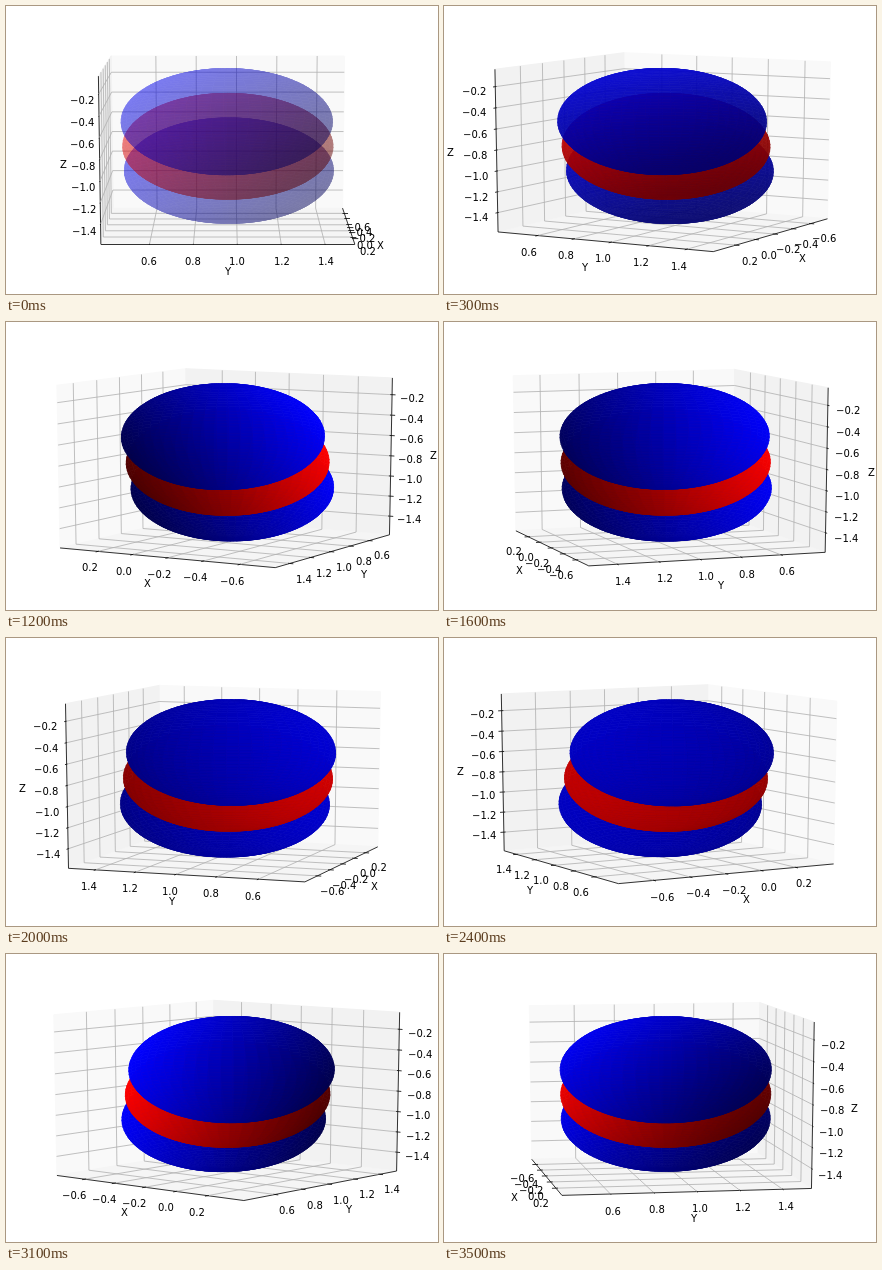
An HTML page with a canvas that plays this animation: 432x288 px, repeating every 3.6 s.

```html
<!DOCTYPE html>
<html lang="en">
<head>
<meta charset="utf-8">
<title>Three spheres</title>
<style>
  html, body { margin: 0; width: 100%; height: 100%; overflow: hidden; background: #fff; }
  canvas { display: block; }
</style>
</head>
<body>
<canvas id="stage" width="432" height="288"></canvas>
<script>
const W = 432, H = 288;
const STEPS = 36, STEP_MS = 100;
const ctx = document.getElementById('stage').getContext('2d');

function makeLayer() {
  const c = document.createElement('canvas');
  c.width = W;
  c.height = H;
  return c.getContext('2d');
}
const back = makeLayer(), front = makeLayer();

// Data space: box centre and range for x, y, z
const centre = [-0.1845, 0.957, -0.812];
const range = [1.166, 1.111, 1.488];
const shift = [-0.03, 0.005, -0.244];
const RADIUS = 0.5;

// Box in unit space, centred on the origin
const EDGE = 0.5 + 1 / 48;
const DELTA = 1 / 12;
const PER_POINT = 48 / (W + H);
const TICK_PAD = 11.5 * PER_POINT * DELTA;
const NAME_PAD = 25 * PER_POINT * DELTA;

const axes = [
  { name: 'X', i: 0, tickDir: 1, flip: 1, ticks: [-0.6, 5], pane: '#f9f9f9' },
  { name: 'Y', i: 1, tickDir: 0, flip: 0, ticks: [0.6, 5], pane: '#f2f2f2' },
  { name: 'Z', i: 2, tickDir: 0, flip: 0, ticks: [-1.4, 7], pane: '#f5f5f5' }
];

const DIST = 10, VIEW = 0.185;
const elev = Math.PI / 18;
const ce = Math.cos(elev), se = Math.sin(elev);
let ca = 1, sa = 0;

function project([x, y, z]) {
  const toward = ca * x + sa * y;
  const depth = ce * toward + se * z;
  const k = 1 / (DIST - depth) / VIEW;
  const right = ca * y - sa * x;
  const up = ce * z - se * toward;
  return [W * (0.095 / VIEW + right * k), H * (0.09 / VIEW - up * k)];
}

const withValue = (p, i, v) => p.map((old, j) => j === i ? v : old);
const outward = (p, skip, d) => p.map((v, j) => j === skip ? v : v + (v < 0 ? -d : d));

function trace(c, pts) {
  c.beginPath();
  pts.forEach(([x, y], j) => j ? c.lineTo(x, y) : c.moveTo(x, y));
}

function line(points, color) {
  const pts = points.map(project);
  if (pts.length === 2) {
    for (const k of [0, 1]) {
      if (Math.abs(pts[0][k] - pts[1][k]) < 0.01) {
        pts[0][k] = pts[1][k] = Math.floor(pts[0][k]) + 0.5;
      }
    }
  }
  trace(ctx, pts);
  ctx.strokeStyle = color;
  ctx.lineWidth = 0.8;
  ctx.stroke();
}

function text(str, p, drop) {
  const [x, y] = project(p);
  ctx.fillStyle = '#000';
  ctx.fillText(str, Math.round(x - ctx.measureText(str).width / 2), Math.round(y + drop));
}

function drawPane(axis, far) {
  const a = (axis.i + 1) % 3, b = (axis.i + 2) % 3;
  const corners = [[-1, -1], [1, -1], [1, 1], [-1, 1]].map(([m, n]) => {
    const p = far.slice();
    p[a] = m * EDGE;
    p[b] = n * EDGE;
    return project(p);
  });
  trace(ctx, corners);
  ctx.closePath();
  ctx.fillStyle = ctx.strokeStyle = axis.pane;
  ctx.lineWidth = 1;
  ctx.fill();
  ctx.stroke();
}

function drawAxis({ name, i, tickDir, flip, ticks }, far) {
  const edge = withValue(far, flip, -far[flip]);
  line([withValue(edge, i, -EDGE), withValue(edge, i, EDGE)], '#000');
  text(name, outward(withValue(edge, i, 0), i, NAME_PAD), 3);

  const [first, count] = ticks;
  const values = Array.from({ length: count }, (_, n) => first + n * 0.2);
  const places = values.map(v => (v - centre[i]) / range[i]);
  const a = (i + 1) % 3, b = (i + 2) % 3;
  for (const u of places) {
    const p = withValue(far, i, u);
    line([withValue(p, a, -p[a]), p, withValue(p, b, -p[b])], '#b0b0b0');
  }

  const sign = far[tickDir] > 0 ? 1 : -1;
  places.forEach((u, n) => {
    const p = withValue(edge, i, u);
    const at = f => withValue(p, tickDir, p[tickDir] + f * sign * DELTA);
    line([at(0.1), at(-0.2)], '#000');
    const v = values[n];
    const label = (v < -0.01 ? '\u2212' : '') + Math.abs(v).toFixed(1);
    text(label, outward(p, i, TICK_PAD), 8);
  });
}

// Sphere mesh: longitude u, polar angle v
const FACETS = 50, LAST = 99;
const angle = (n, span) => Math.min(2 * n, LAST) / LAST * span;
const normal = (u, v) => [Math.cos(u) * Math.sin(v), Math.sin(u) * Math.sin(v), Math.cos(v)];
const mesh = [];
for (let m = 0; m <= FACETS; m++) {
  mesh.push([]);
  for (let n = 0; n <= FACETS; n++) {
    mesh[m].push(normal(angle(m, 2 * Math.PI), angle(n, Math.PI)));
  }
}

function facetShade(m, n) {
  const [x, y, z] = normal(
    (angle(m, 2 * Math.PI) + angle(m + 1, 2 * Math.PI)) / 2,
    (angle(n, Math.PI) + angle(n + 1, Math.PI)) / 2);
  const lit = (-x - y + 0.5 * z) / 1.5;
  return 0.3 + 0.7 * (lit + 1) / 2;
}

function drawSphere(place, red, copies) {
  back.clearRect(0, 0, W, H);
  front.clearRect(0, 0, W, H);
  const pts = mesh.map(row => row.map(p =>
    project(p.map((v, j) => (v * RADIUS + place * shift[j]) / range[j]))));

  for (let m = 0; m < FACETS; m++) {
    for (let n = 0; n < FACETS; n++) {
      const q = [pts[m][n], pts[m + 1][n], pts[m + 1][n + 1], pts[m][n + 1]];
      const turn = (q[2][0] - q[0][0]) * (q[3][1] - q[1][1]) -
                   (q[2][1] - q[0][1]) * (q[3][0] - q[1][0]);
      const c = turn > 0 ? front : back;
      const s = Math.round(255 * facetShade(m, n));
      c.fillStyle = c.strokeStyle = red ? `rgb(${s},0,0)` : `rgb(0,0,${s})`;
      c.lineWidth = 0.6;
      trace(c, q);
      c.closePath();
      c.fill();
      c.stroke();
    }
  }

  // Stacked copies of a 0.3-alpha shell, folded into one blend
  const alpha = 0.3, through = (1 - alpha) ** 2;
  back.globalAlpha = alpha / (1 - through);
  back.drawImage(front.canvas, 0, 0);
  back.globalAlpha = 1;
  ctx.globalAlpha = 1 - through ** copies;
  ctx.drawImage(back.canvas, 0, 0);
  ctx.globalAlpha = 1;
}

function draw(step) {
  const azim = step * 2 * Math.PI / STEPS;
  ca = Math.cos(azim);
  sa = Math.sin(azim);
  const far = [ca > 0 ? -EDGE : EDGE, sa >= 0 ? -EDGE : EDGE, -EDGE];

  ctx.fillStyle = '#fff';
  ctx.fillRect(0, 0, W, H);
  ctx.font = '10px "DejaVu Sans", sans-serif';
  axes.forEach(axis => drawPane(axis, far));
  axes.forEach(axis => drawAxis(axis, far));

  drawSphere(1, false, step + 1);
  drawSphere(0, true, step + 1);
  drawSphere(-1, false, step + 1);
}

const start = performance.now();
let shown = -1;
function tick() {
  const step = Math.floor((performance.now() - start) / STEP_MS) % STEPS;
  if (step !== shown) {
    shown = step;
    draw(step);
  }
  requestAnimationFrame(tick);
}
tick();
</script>
</body>
</html>
```
